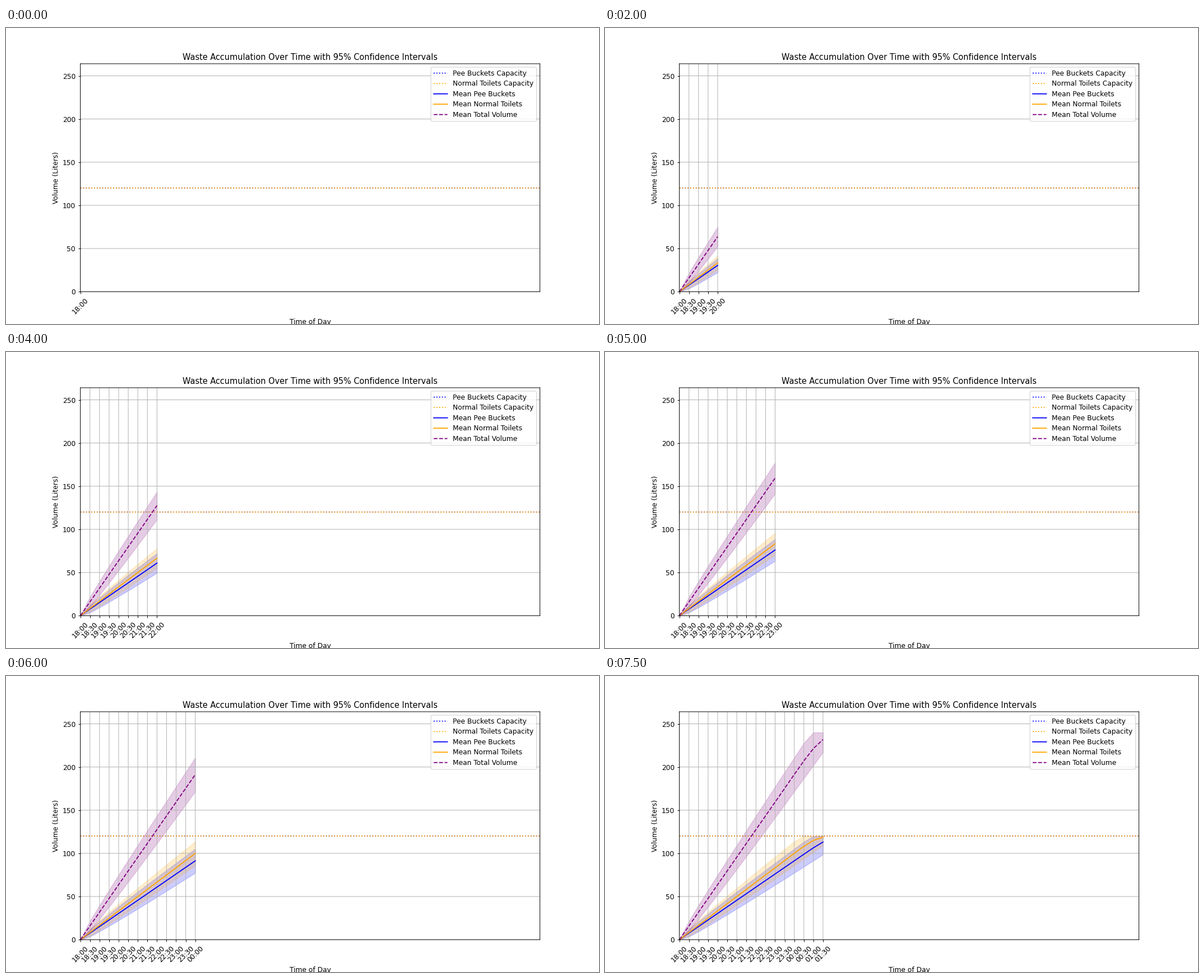
Write a matplotlib script that moves like this. It is 1058x529 px and loops after 8 s.

```python
import math

import matplotlib.pyplot as plt
import numpy as np
from matplotlib.animation import FuncAnimation

STEPS = 16           # half-hour samples shown in one loop
CAPACITY = 120       # litres per container type
SPREAD = 4           # 95% half-width after one step, grows with sqrt(step)

plt.rcParams["path.snap"] = False

step = np.arange(STEPS)
labels = [f"{(18 + s // 2) % 24:02d}:{30 * (s % 2):02d}" for s in step]


def capped_mean(mu, sd):
    """Expected value of a normal variable that cannot exceed CAPACITY."""
    if sd == 0:
        return mu
    a = (CAPACITY - mu) / sd
    density = math.exp(-a * a / 2) / math.sqrt(2 * math.pi)
    above = (1 - math.erf(a / math.sqrt(2))) / 2
    return mu - sd * (density - a * above)


def band(rate, spread, cap):
    half = spread * np.sqrt(step)
    return rate * step - half, np.minimum(rate * step + half, cap)


def means(rate):
    return np.array([capped_mean(rate * s, SPREAD * math.sqrt(s) / 1.96) for s in step])


pee_rate, toilet_rate = 7.61, 8.33
pee, toilet = means(pee_rate), means(toilet_rate)
series = [
    ("Mean Pee Buckets", "blue", "-", pee,
     band(pee_rate, SPREAD, CAPACITY)),
    ("Mean Normal Toilets", "orange", "-", toilet,
     band(toilet_rate, SPREAD, CAPACITY)),
    ("Mean Total Volume", "purple", "--", pee + toilet,
     band(pee_rate + toilet_rate, SPREAD * math.sqrt(2), 2 * CAPACITY)),
]

fig, ax = plt.subplots(figsize=(12, 6), dpi=1058 / 12)
fig.subplots_adjust(left=0.1254, right=0.9004, bottom=0.1092, top=0.8792)


def draw(frame):
    n = frame + 1
    ax.clear()
    ax.axhline(CAPACITY, color="blue", ls=":", label="Pee Buckets Capacity")
    ax.axhline(CAPACITY, color="orange", ls=":", label="Normal Toilets Capacity")
    for label, color, style, mean, (low, high) in series:
        ax.plot(step[:n], mean[:n], color=color, ls=style, label=label)
        ax.fill_between(step[:n], low[:n], high[:n], color=color, alpha=0.2)
    ax.set_xlim(0, 48)
    ax.set_ylim(0, 2.2 * CAPACITY)
    ax.set_xticks(step[:n], labels[:n], rotation=45)
    ax.set_xlabel("Time of Day")
    ax.set_ylabel("Volume (Liters)")
    ax.set_title("Waste Accumulation Over Time with 95% Confidence Intervals",
                 fontsize=11.87)
    ax.legend(loc="upper right", labelspacing=0.45)
    ax.grid(True)


anim = FuncAnimation(fig, draw, frames=STEPS, init_func=lambda: draw(0),
                     interval=500, repeat=True, repeat_delay=0)
plt.show()
```
